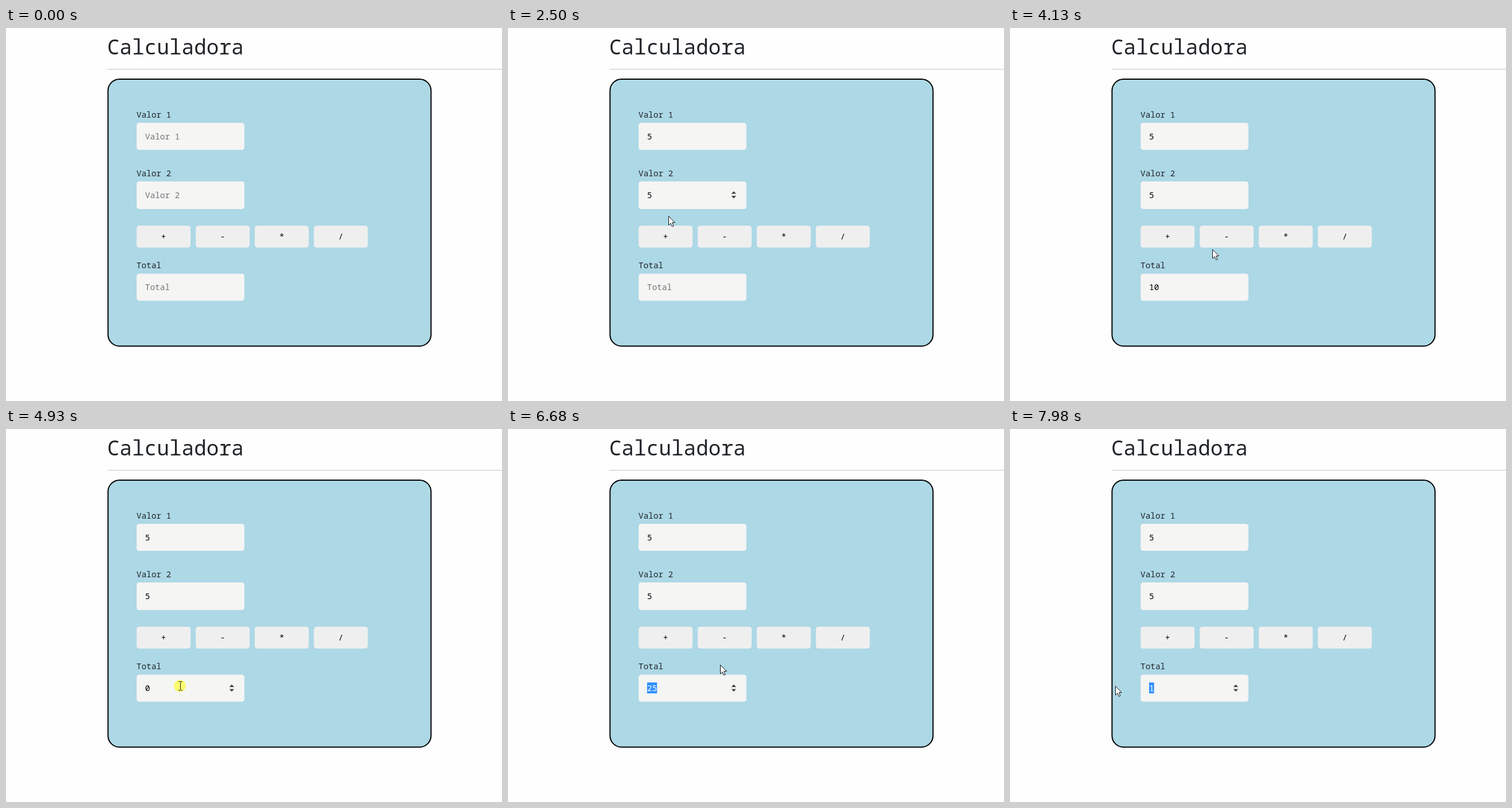
Animation, 863 px wide and 649 px high, one loop 8000 ms. Source, as an HTML page with a canvas:

```html
<!DOCTYPE html>
<html lang="pt">
<head>
<meta charset="utf-8">
<title>Calculadora</title>
<style>
html, body { margin: 0; width: 100%; height: 100%; overflow: hidden; background: #fefefe; }
canvas { display: block; }
</style>
</head>
<body>
<canvas id="stage" width="863" height="649"></canvas>
<script>
const ctx = document.getElementById('stage').getContext('2d');
const FONT = '"Noto Sans Mono", "DejaVu Sans Mono", monospace';
const LOOP = 8000;
const MOVE = 180;
const CLICK = 80;
const DRAG = 200;
const FADE = 80;
const CHAR = 8.64;
const TEXT_X = 242;
const FIELD_X = 227.3;
const FIELD_W = 187.5;
const RESULT_Y = 447;

const fields = [
  { label: 'Valor 1', y: 165, h: 47, focus: 480, typed: 1340, blur: 1680 },
  { label: 'Valor 2', y: 267, h: 48, focus: 1680, typed: 2170, blur: 2820 },
  { label: 'Total', y: 427.5, h: 47 }
];

// Each round: press an operator, select the result by dragging, click beside it
const rounds = [
  { sign: '+', result: '10', press: 2820, drag: 3160, from: 296, to: 227, back: 3580, clear: 3930, x: 329, y: 416 },
  { sign: '-', result: '0', press: 4500, drag: 4930, from: 303, to: 177, back: 5280, clear: 5460, x: 344, y: 403 },
  { sign: '*', result: '25', press: 5930, drag: 6290, from: 320, to: 192, back: 6540, clear: 6750, x: 393, y: 405 },
  { sign: '/', result: '1', press: 7260, drag: 7690, from: 358, to: 183, clear: LOOP }
];

const moves = [
  { at: 60, x: 311, y: 189, time: 390 },
  { at: 1500, x: 283, y: 282 },
  { at: 2410, x: 275, y: 370 }
];
const presses = [[480, 660], [1680, 1680 + CLICK]];

rounds.forEach((r, i) => {
  r.left = FIELD_X + i * 102.8;
  moves.push({ at: r.press + 90, x: r.from, y: RESULT_Y });
  moves.push({ at: r.drag, x: r.to, y: RESULT_Y, time: DRAG });
  presses.push([r.press, r.press + CLICK], [r.drag, r.drag + DRAG]);
  if (!r.back) return;
  moves.push({ at: r.back, x: r.x, y: r.y });
  moves.push({ at: r.clear + CLICK, x: 360 + i * 90, y: 375 });
  presses.push([r.clear, r.clear + CLICK]);
});

const within = (v, from, to) => v >= from && v < to;
const inField = (p, f) => within(p.x, FIELD_X, FIELD_X + FIELD_W) && within(p.y, f.y, f.y + f.h);

function pointerAt(t) {
  const p = { x: 767, y: 604 };
  for (const { at, x, y, time = MOVE } of moves) {
    const u = Math.max(0, Math.min(1, (t - at) / time));
    const s = u * u * (3 - 2 * u);
    p.x += (x - p.x) * s;
    p.y += (y - p.y) * s;
  }
  return p;
}

function valueOf(field, t) {
  if (field.typed) return t >= field.typed ? '5' : '';
  const done = rounds.filter(r => t >= r.press + CLICK).pop();
  return done ? done.result : '';
}

function box(x, y, w, h, r, fill) {
  ctx.beginPath();
  ctx.roundRect(x, y, w, h, r);
  ctx.fillStyle = fill;
  ctx.fill();
}

function write(text, x, y, color, advance = CHAR, align = 'left') {
  ctx.font = `${advance / 0.6}px ${FONT}`;
  ctx.textAlign = align;
  ctx.fillStyle = color;
  ctx.fillText(text, x, y);
}

function poly(points, fill) {
  ctx.beginPath();
  points.forEach(([x, y]) => ctx.lineTo(x, y));
  ctx.closePath();
  ctx.fillStyle = fill;
  ctx.fill();
}

function drawSpinner(y) {
  for (const dir of [-1, 1]) {
    const base = y + dir * 1.8;
    poly([[388.5, base], [397, base], [392.75, base + dir * 4.5]], '#444');
  }
}

function drawSelection(text, base, t, round) {
  const { x } = pointerAt(Math.min(t, round.drag + DRAG));
  const first = Math.max(0, Math.min(text.length, Math.round((x - TEXT_X) / CHAR)));
  const part = text.slice(first);
  const left = TEXT_X + first * CHAR;
  ctx.fillStyle = '#3390ff';
  ctx.fillRect(left, base - 15, part.length * CHAR, 19);
  write(part, left, base, '#fff');
}

function drawCaret({ focus, typed, blur }, base, t) {
  const since = t < typed ? focus : typed;
  if (!within(t, focus, blur) || (t - since) % 700 >= 330) return;
  ctx.fillStyle = '#000';
  ctx.fillRect(t < typed ? 242 : 251, base - 15, 1, 19);
}

function drawField(field, t, pointer) {
  const { label, y, h, typed, focus, blur } = field;
  const base = Math.round(y + 28.7);
  const text = valueOf(field, t);
  const selected = !typed && rounds.find(r => within(t, r.drag, r.clear));
  write(label, 227, Math.round(y - 9.2), '#212529');
  box(FIELD_X, y, FIELD_W, h, 4.5, '#f5f5f4');
  write(text || label, TEXT_X, base, text ? '#000' : '#757575');
  if (selected || within(t, focus, blur) || (pointer && inField(pointer, field))) drawSpinner(y + 23.2);
  if (selected) drawSelection(text, base, t, selected);
  if (typed) drawCaret(field, base, t);
}

function drawButton({ sign, left }, pointer) {
  const hover = pointer && within(pointer.x, left, left + 94) && within(pointer.y, 344, 382);
  box(left, 344, 93.8, 38, 4.5, hover ? '#e3e3e3' : '#efefef');
  write(sign, left + 46.8, 368, '#000', CHAR, 'center');
}

function drawHighlight(t, { x, y }) {
  const press = presses.find(([down, up]) => within(t, down, up + FADE));
  if (!press) return;
  const fade = Math.max(0, (t - press[1]) / FADE);
  ctx.beginPath();
  ctx.arc(x - 0.5, y, 10.5 + fade, 0, Math.PI * 2);
  ctx.fillStyle = `rgba(255,255,0,${0.55 * (1 - fade)})`;
  ctx.fill();
}

function drawPointer(p) {
  ctx.save();
  ctx.translate(Math.round(p.x), Math.round(p.y));
  if (fields.some(f => inField(p, f))) {
    ctx.fillStyle = '#222';
    ctx.fillRect(0, -7, 1, 14);
    for (const y of [-8, 7]) {
      ctx.fillRect(-3, y, 3, 1);
      ctx.fillRect(1, y, 3, 1);
    }
  } else {
    poly([[0.5, 0.5], [0.5, 16], [4, 12.7], [6.5, 18.4], [9, 17.3], [6.6, 11.7], [11.4, 11.5]], '#fff');
    ctx.strokeStyle = '#111';
    ctx.lineWidth = 1;
    ctx.stroke();
  }
  ctx.restore();
}

function draw(t) {
  const pointer = t >= 60 ? pointerAt(t) : null;
  ctx.fillStyle = '#fefefe';
  ctx.fillRect(0, 0, 863, 649);
  write('Calculadora', 176, 46, '#212529', 21.6);
  ctx.fillStyle = '#d6d6d6';
  ctx.fillRect(176.5, 71, 687, 1.5);
  box(177.5, 89, 562, 464.5, 20, '#add8e6');
  ctx.strokeStyle = '#000';
  ctx.lineWidth = 2;
  ctx.stroke();
  fields.forEach(f => drawField(f, t, pointer));
  rounds.forEach(r => drawButton(r, pointer));
  if (pointer) {
    drawHighlight(t, pointer);
    drawPointer(pointer);
  }
}

const start = performance.now();
function tick() {
  draw((performance.now() - start) % LOOP);
  requestAnimationFrame(tick);
}
tick();
</script>
</body>
</html>
```
